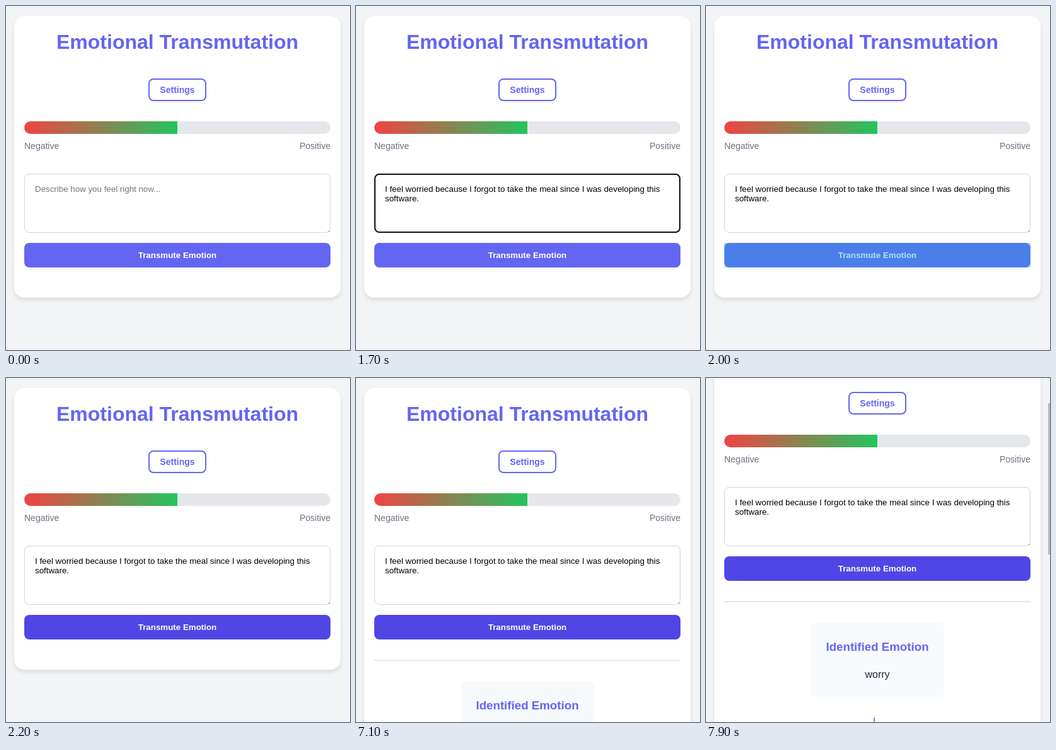
Recreate the animation shown at these times as an HTML page. Size 546x546 px, loop 8000 ms.

```html
<!DOCTYPE html>
<html lang="en">
<head>
<meta charset="utf-8">
<title>Emotional Transmutation</title>
<style>
  :root { --accent: #6366f1; --line: #e5e7eb; }
  html, body { margin: 0; width: 100%; height: 100%; overflow: hidden; background: #f3f4f6; }
  body { position: relative; font-family: "Liberation Sans", Arial, sans-serif; }
  div { position: absolute; box-sizing: border-box; white-space: nowrap; }

  /* every state change is a hard cut on one shared 8 s clock */
  .page, .card, .scrollbar, .hint, .typed, .caret, .ring, .send, .tap, .result {
    animation: 8s step-end infinite;
  }

  .page { left: 0; top: 0; width: 544px; height: 1200px; animation-name: scroll; }
  .card {
    left: 13px; top: 16px; width: 518px; height: 447px; border-radius: 16px;
    background: #fff; box-shadow: 0 4px 6px rgba(0, 0, 0, .1); animation-name: grow;
  }
  .center { left: 0; width: 544px; text-align: center; }
  .title { top: 32px; font: bold 32px/51px "Liberation Sans", Arial, sans-serif; color: var(--accent); }
  .settings {
    left: 226.4px; top: 115px; width: 91.2px; height: 36px; border: 2px solid var(--accent);
    border-radius: 8px; font-weight: bold; font-size: 14px; line-height: 32px;
    text-align: center; color: var(--accent);
  }

  .meter {
    left: 29px; top: 183px; width: 486px; height: 20px; border-radius: 10px;
    background: var(--line); overflow: hidden;
  }
  .fill { left: 0; top: 0; width: 50%; height: 100%; background: linear-gradient(90deg, #ef4444, #22c55e); }
  .label { top: 211px; font-size: 14px; line-height: 22px; color: #6b7280; }
  .negative { left: 29px; }
  .positive { right: 29px; }

  .field, .ring { left: 29px; top: 266px; width: 486px; height: 94px; border-radius: 8px; }
  .field { border: 1px solid #d1d5db; background: #fff; }
  .grip { left: 512px; top: 357px; width: 2px; height: 1px; background: #777; }
  .ring { border: 2px solid #101010; background: #fff; animation-name: focus; }
  .hint, .typed { left: 46px; top: 283px; font-size: 13.3333px; line-height: 15px; }
  .hint { color: #757575; animation-name: hint; }
  .typed { color: #000; animation-name: typed; }
  .caret { left: 46px; top: 283px; width: 1px; height: 15px; background: #000; animation-name: caret; }

  .send, .tap { left: 29px; top: 376px; width: 486px; height: 39px; }
  .send {
    border-radius: 8px; background: var(--accent); color: #fff; text-align: center;
    font-weight: bold; font-size: 13.3333px; line-height: 39px; animation-name: press;
  }
  .tap { background: rgba(51, 181, 229, .4); animation-name: tap; }

  .result { left: 0; top: 0; width: 544px; height: 1200px; animation-name: result; }
  .rule { left: 29px; top: 447px; width: 486px; height: 2px; background: var(--line); }
  .panel { left: 166.3px; top: 481px; width: 211.4px; height: 119px; border-radius: 8px; background: #f7fafc; }
  .heading { top: 505px; font-weight: bold; font-size: 18.72px; line-height: 30px; color: var(--accent); }
  .emotion { top: 551px; font-size: 16px; line-height: 25px; color: #1f2937; }
  .arrow { left: 266px; top: 632px; width: 2px; height: 24px; background: var(--accent); opacity: .8; }

  .scrollbar { left: 543px; top: 3px; width: 3px; height: 240px; background: #b9babc; animation-name: thumb; }

  @keyframes scroll { 0% { top: 0; } 97.5% { top: -7px; } 98.75%, 100% { top: -93px; } }
  @keyframes grow { 0% { height: 447px; } 88.75%, 100% { height: 1150px; } }
  @keyframes thumb {
    0% { visibility: hidden; top: 3px; }
    97.5% { visibility: visible; top: 3px; }
    98.75%, 100% { visibility: visible; top: 40px; }
  }
  @keyframes focus { 0% { visibility: hidden; } 6.25% { visibility: visible; } 25%, 100% { visibility: hidden; } }
  @keyframes hint { 0% { visibility: visible; } 13.75%, 100% { visibility: hidden; } }
  @keyframes typed { 0% { visibility: hidden; } 13.75%, 100% { visibility: visible; } }
  @keyframes caret {
    0% { visibility: hidden; left: 46px; top: 283px; }
    6.25% { visibility: visible; left: 46px; top: 283px; }
    13.75% { visibility: visible; left: 100px; top: 298px; }
    21.25%, 100% { visibility: hidden; left: 100px; top: 298px; }
  }
  @keyframes press {
    0% { background: #6366f1; }
    25% { background: #595cea; }
    26.25% { background: #5049e6; }
    27.5%, 100% { background: #4f46e5; }
  }
  @keyframes tap { 0% { visibility: hidden; } 25% { visibility: visible; } 27.5%, 100% { visibility: hidden; } }
  @keyframes result { 0% { visibility: hidden; } 88.75%, 100% { visibility: visible; } }
</style>
</head>
<body>
  <div class="page">
    <div class="card"></div>
    <div class="center title">Emotional Transmutation</div>
    <div class="settings">Settings</div>

    <div class="meter"><div class="fill"></div></div>
    <div class="label negative">Negative</div>
    <div class="label positive">Positive</div>

    <div class="field"></div>
    <div class="grip"></div>
    <div class="ring"></div>
    <div class="hint">Describe how you feel right now...</div>
    <div class="typed">I feel worried because I forgot to take the meal since I was developing this<br>software.</div>
    <div class="caret"></div>

    <div class="send">Transmute Emotion</div>
    <div class="tap"></div>

    <div class="result">
      <div class="rule"></div>
      <div class="panel"></div>
      <div class="center heading">Identified Emotion</div>
      <div class="center emotion">worry</div>
      <div class="arrow"></div>
    </div>
  </div>
  <div class="scrollbar"></div>
</body>
</html>
```
